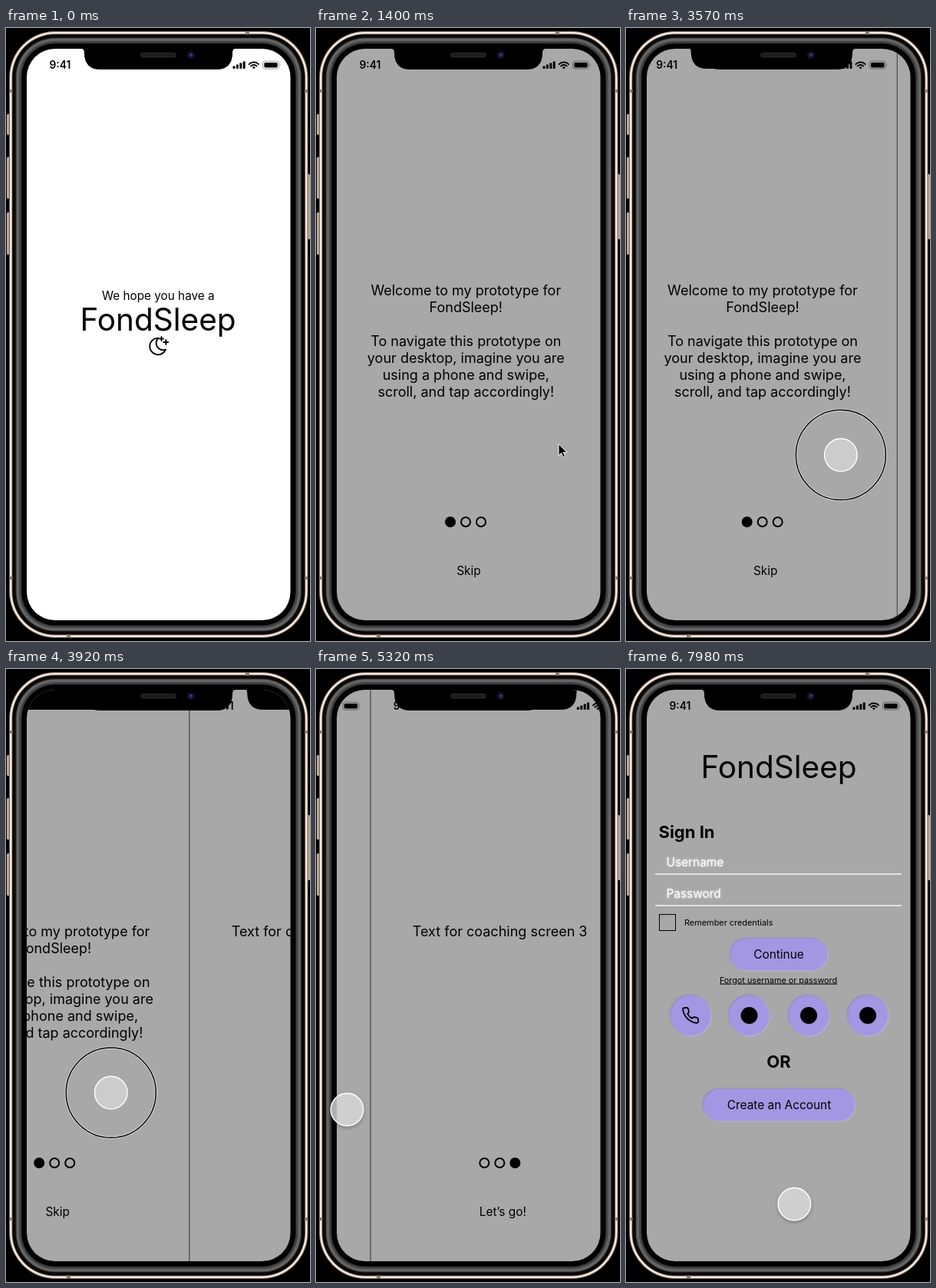
Animation of 396x798 px, one loop 8000 ms. Source, as an HTML page:

```html
<!DOCTYPE html>
<html lang="en">
<head>
<meta charset="utf-8">
<style>
html, body { margin: 0; width: 100%; height: 100%; overflow: hidden; background: #000; }
svg { display: block; width: 396px; height: 798px; font-family: Inter, Roboto, sans-serif; font-optical-sizing: none; }
.glow { filter: drop-shadow(0 0 1.5px rgba(255, 255, 255, .7)); }
.raised { filter: drop-shadow(-1px -1px 1px #8d84bb) drop-shadow(1px 1px 1px #b9b2dd); }
</style>
</head>
<body>
<svg id="stage" viewBox="0 0 396 798"></svg>
<script>
const PAGE = 344, LOOP = 8000, BRAND = 'FondSleep';
const GRAY = '#a8a8a8', LILAC = '#a396e2';

// ---- drawing helpers ----
const text = (x, y, size, str, attrs = 'text-anchor="middle"') =>
  `<text x="${x}" y="${y}" font-size="${size}" ${attrs}>${str}</text>`;
const rect = (x, y, w, h, r, fill, attrs = '') =>
  `<rect x="${x}" y="${y}" width="${w}" height="${h}" rx="${r}" fill="${fill}" ${attrs}/>`;
const circle = (x, y, r, fill, attrs = '') =>
  `<circle cx="${x}" cy="${y}" r="${r}" fill="${fill}" ${attrs}/>`;
const path = (d, attrs) => `<path d="${d}" ${attrs}/>`;
const line = (w, color = '#000') => `fill="none" stroke="${color}" stroke-width="${w}" stroke-linecap="round" stroke-linejoin="round"`;
// rounded rectangle grown by d around the display
const shell = (d, fill) => rect(27 - d, 27 - d, 343.5 + 2 * d, 744 + 2 * d, 37 + d, fill);

const notch = 'M98 26V27Q102 27 102 32Q102 54 123 54H274Q295 54 295 32Q295 27 299 27V26Z';

const statusBar = text(56.5, 53, 13.8, '9:41', 'font-weight="600"') +
  [0, 1, 2, 3].map(i => rect(295.5 + i * 4.4, 49.5 - i * 2, 3, 3.5 + i * 2, 0.8, '#000')).join('') +
  path('M316.6 47.2a8.6 8.6 0 0 1 12.4 0M319 49.6a5.2 5.2 0 0 1 7.6 0', line(1.9)) +
  path('M322.8 53.4l-2-2.2a3 3 0 0 1 4 0Z', '') +
  rect(334.5, 43.2, 21, 10, 3, 'none', 'stroke="#000" stroke-opacity=".4"') +
  rect(336.3, 45, 17.4, 6.4, 1.6, '#000') +
  path('M357 46.6q1.4 1.6 0 3.2Z', 'opacity=".5"');

const page = (fill, body, shift = 0) => `<g transform="translate(${shift})">` +
  rect(27, 27, PAGE, 745, 0, fill) + statusBar +
  path(notch, 'transform="translate(0 -1)"') + body + '</g>';

const moon = path('M12 3c.132 0 .263 0 .393 0a7.5 7.5 0 0 0 7.92 12.446a9 9 0 1 1-8.313-12.454z',
  'transform="translate(183.6 400)scale(1.2)" ' + line(1.6)) +
  path('M202.5 402v5M200 404.5h5M208.3 406v6M205.3 409h6', line(1.8));

const splash = page('#fff', text(198.3, 354, 15.3, 'We hope you have a') +
  text(198, 394, 40.5, BRAND) + moon);

const coaching = (index, lines, action) => page(GRAY,
  lines.map((s, i) => text(195.3, 348 + i * 22, 18, s)).join('') +
  [0, 1, 2].map(i => circle(175 + i * 20, 643, 6, i == index ? '#000' : 'none', 'stroke="#000" stroke-width="2"')).join('') +
  text(199, 712, 15.4, action) +
  rect(26, 27, 1, 745, 0, '#484848'), index * PAGE);

const pages = coaching(0, ['Welcome to my prototype for', BRAND + '!', '',
    'To navigate this prototype on', 'your desktop, imagine you are',
    'using a phone and swipe,', 'scroll, and tap accordingly!'], 'Skip') +
  coaching(1, ['Text for coaching screen 2'], 'Skip') +
  coaching(2, ['Text for coaching screen 3'], 'Let’s go!');

const field = (label, y) => text(52.5, y, 15.4, label, 'fill="#fff" class="glow"') +
  rect(38, y + 9.3, 321, 1.3, 0, '#fff');
const button = (x, y, w, label, base) => rect(x, y, w, 41, 20.5, LILAC, 'class="raised"') +
  text(x + w / 2, base, 15.4, label);
const phone = path('M22 16.9v3a2 2 0 0 1-2.2 2a19.8 19.8 0 0 1-8.6-3.1a19.5 19.5 0 0 1-6-6a19.8 19.8 0 0 1-3.1-8.6A2 2 0 0 1 4.1 2h3a2 2 0 0 1 2 1.7a12.8 12.8 0 0 0 .7 2.8a2 2 0 0 1-.5 2.1L8.1 9.9a16 16 0 0 0 6 6l1.3-1.3a2 2 0 0 1 2.1-.4a12.8 12.8 0 0 0 2.8.7a2 2 0 0 1 1.7 2z',
  'transform="translate(72 439)" ' + line(1.8));

const signIn = page(GRAY, text(199, 142, 40.5, BRAND) +
  text(42.5, 220, 22, 'Sign In', 'font-weight="700"') +
  field('Username', 257) + field('Password', 298) +
  rect(43.5, 319.5, 21, 21, 0, 'none', 'stroke="#000"') +
  text(76, 334, 10.9, 'Remember credentials', '') +
  button(136, 351, 126, 'Continue', 377) +
  text(198.5, 408.5, 10.8, 'Forgot username or password', 'text-anchor="middle" text-decoration="underline"') +
  [84, 160.5, 238, 315].map((x, i) => circle(x, 451, 26, LILAC, 'class="raised"') +
    (i ? circle(x, 451, 11, '#000') : phone)).join('') +
  text(199, 519, 22, 'OR', 'text-anchor="middle" font-weight="700"') +
  button(101, 547, 197, 'Create an Account', 573));

const device =
  [[112, 27], [168, 54], [240, 55]].map(([y, h]) => rect(1, y, 4, h, 1.5, '#bda898')).join('') +
  rect(392.5, 190, 3.5, 85, 1.5, '#bda898') +
  shell(23, '#6f5c50') + shell(22, '#f4e8df') + shell(19.5, '#8d7a6e') + shell(18.8, '#0a0807') +
  shell(14.5, '#2b2b2b') + shell(13.5, '#646464') + shell(10, '#444') + shell(7.5, '#222') + shell(6.5, '#000') +
  [[312, 5], [79, 789.5]].map(([x, y]) => rect(x, y, 5, 3.5, 0, '#94796a')).join('') +
  [80, 714].map(y => rect(4.5, y, 4, 4, 0, '#94796a') + rect(389, y, 4, 4, 0, '#94796a')).join('');

const sensors = path(notch, '') + rect(175.5, 32.5, 46, 5.5, 2.7, '#1d1d1d', 'stroke="#2a2a2a"') +
  circle(240.7, 35.3, 5.2, '#0d1120') + circle(240.7, 35.3, 2.6, '#1c2c55') + circle(241.6, 34.4, 1, '#4a5a80');

const stage = document.getElementById('stage');
stage.innerHTML = `<defs><clipPath id="display">${shell(0, '#000')}</clipPath></defs>` + device +
  `<g clip-path="url(#display)"><g id="splash">${splash}</g><g id="pages">${pages}</g><g id="signIn">${signIn}</g></g>` +
  sensors +
  `<g id="arrow">${path('M0 0V15L3.5 11.8L6 17.3L8.6 16.2L6.2 10.9H11Z', 'stroke="#fff"')}</g>
  <g id="touch">
    <g id="ring">${circle(0, 0, 58.5, 'none', 'stroke="#fff" stroke-opacity=".75" stroke-width="3"') +
      circle(0, 0, 58.5, 'none', 'stroke="#000" stroke-width="1.5"')}</g>
    <g id="dot">${circle(0, 0, 21.3, 'rgba(231,231,231,.77)', 'stroke="#fff" stroke-width="1.4"')}</g>
  </g>`;
const [splashEl, pagesEl, signInEl, arrowEl, touchEl, ringEl, dotEl] =
  ['splash', 'pages', 'signIn', 'arrow', 'touch', 'ring', 'dot'].map(id => document.getElementById(id));
const discEl = dotEl.firstElementChild;

// ---- motion ----
const clamp = v => Math.min(1, Math.max(0, v));
const smooth = v => (v = clamp(v), v * v * (3 - 2 * v));
const show = (el, on) => el.setAttribute('display', on ? 'inline' : 'none');
const move = (el, x, y) => el.setAttribute('transform', `translate(${x} ${y})`);

// time, x, y
const touchKeys = [[2730, 313.3, 543], [3290, 301.5, 556.5], [3430, 301.5, 556.5], [4150, 85, 550],
  [4830, 312, 580], [4900, 312, 580], [5320, 40.5, 573.5], [5740, 287, 565], [6300, 220.5, 710],
  [7250, 220.5, 710], [7300, 220, 711], [7920, 220, 711], [7980, 219.3, 696.5]];
const arrowKeys = [[560, 400, 770], [1050, 316, 541.5], [1610, 316, 541.5], [1680, 314, 541]];
const presses = [[3220, 3990], [4830, 5166], [6650, 6720]];

function along(keys, t) {
  const i = keys.findIndex(k => k[0] > t);
  if (i < 0) return keys[keys.length - 1].slice(1);
  if (i == 0) return keys[0].slice(1);
  const [a, b] = [keys[i - 1], keys[i]], p = smooth((t - a[0]) / (b[0] - a[0]));
  return [1, 2].map(n => a[n] + (b[n] - a[n]) * p);
}

// the page follows the finger, then eases to the next stop after release
function swipe(t, start, release) {
  if (t < start) return 0;
  const dragged = 0.8 * (along(touchKeys, start)[0] - along(touchKeys, Math.min(t, release))[0]);
  return PAGE - (PAGE - dragged) * (1 - clamp((t - release) / 400)) ** 3;
}

function draw(t) {
  const fade = smooth((t - 985) / 415);
  show(splashEl, fade < 1);
  show(pagesEl, fade > 0 && t < 6720);
  show(signInEl, t >= 6720);
  pagesEl.setAttribute('opacity', fade);
  move(pagesEl, -swipe(t, 3430, 3990) - swipe(t, 4900, 5166), 0);

  show(arrowEl, t >= 560 && t < 2800);
  move(arrowEl, ...along(arrowKeys, t));

  const press = presses.find(([a, b]) => t >= a && t < b);
  show(touchEl, t >= 2730);
  move(touchEl, ...along(touchKeys, t));
  show(ringEl, press);
  if (press) ringEl.setAttribute('transform', `scale(${0.4 + 0.6 * clamp((t - press[0] + 10) / 70)})`);
  discEl.setAttribute('fill', press ? 'rgba(226,226,226,.62)' : 'rgba(231,231,231,.77)');
  dotEl.style.filter = press ? 'none' : 'drop-shadow(0 2px 2px rgba(0,0,0,.3))';
}

function tick() {
  draw(performance.now() % LOOP);
  requestAnimationFrame(tick);
}
tick();
</script>
</body>
</html>
```
